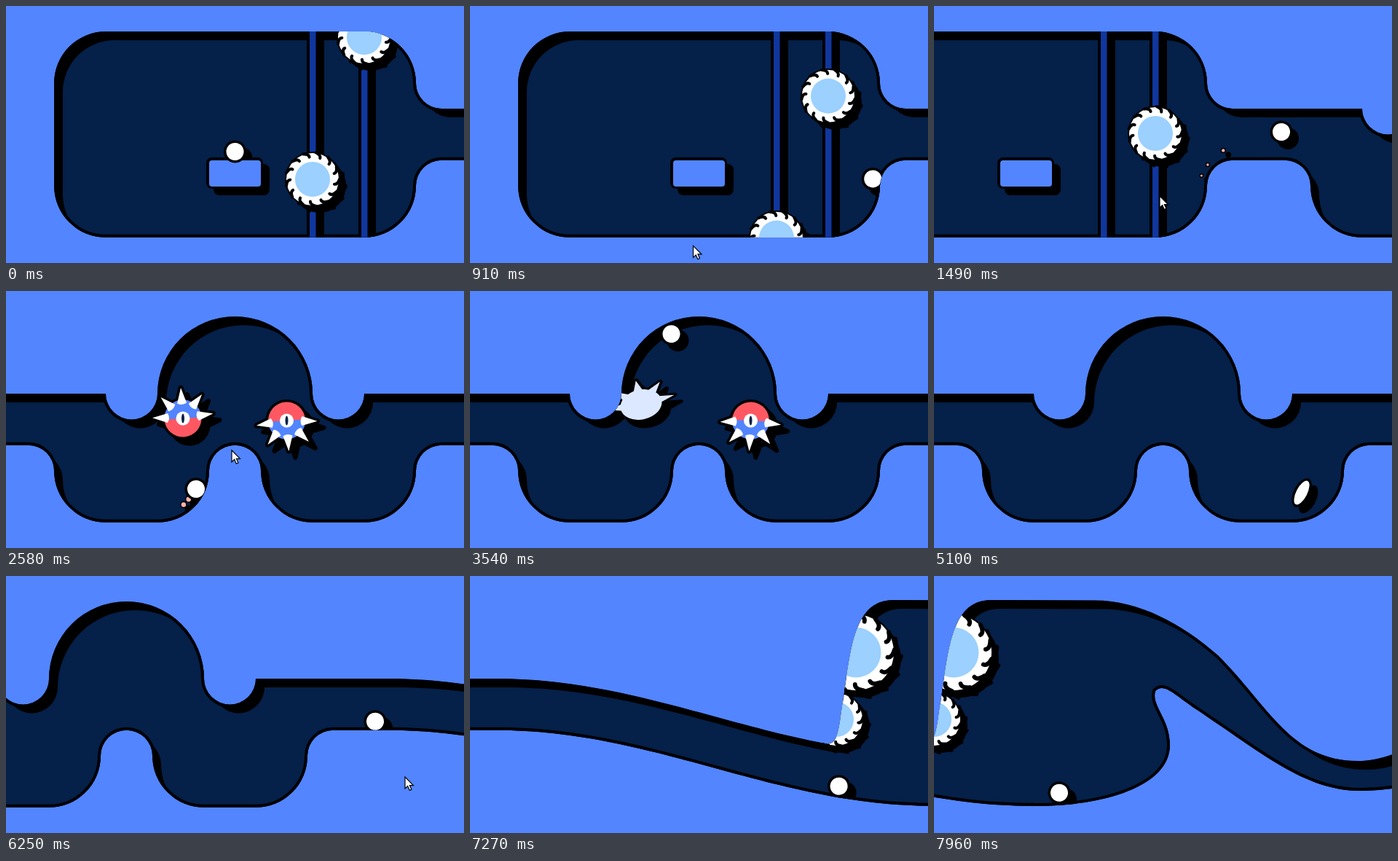
Write an HTML page with a canvas that moves like this. It is 629x353 px and loops after 7.99 s.

```html
<!DOCTYPE html>
<html lang="en">
<head>
<meta charset="utf-8">
<title>Ball run</title>
<style>
html, body { margin: 0; width: 100%; height: 100%; overflow: hidden; background: #5285ff; }
canvas { display: block; }
</style>
</head>
<body>
<canvas id="stage" width="629" height="353"></canvas>
<script>
const ctx = document.getElementById('stage').getContext('2d');
const LOOP = 7990, TICK = 10, W = 629, H = 353;
const PI = Math.PI, Q = PI / 2, TAU = PI * 2;
const BLUE = '#5285ff', NAVY = '#052049', RAIL = '#10379e', SKY = '#9bd0ff';
const RED = '#ff5863', PINK = '#ffb3ab', PALE = '#dce8ff', BLACK = '#000', WHITE = '#fff';
const SHADE = 9, DEPTH = 12, BALL = 12;

// ---- level outline on a grid; one room is 18 cells wide ----
const CELL_X = 35.5, CELL_Y = 35.35, ROOM = 18 * CELL_X;
const gridX = x => 314.5 + x * CELL_X;
const gridY = y => 35 + y * CELL_Y;
const SLOPE_FROM = 1313, SLOPE_TO = 1913;

function slope(x) {
  const u = Math.min(Math.max((x - SLOPE_FROM) / (SLOPE_TO - SLOPE_FROM), 0), 1);
  return 52 * (1 - Math.cos(PI * u));
}

function buildCave() {
  const p = new Path2D();
  const arc = (x, y, r, from, to, back = false) =>
    p.ellipse(gridX(x), gridY(y), r * CELL_X, r * CELL_Y, 0, from, to, back);
  const pit = (left, right) => {
    arc(right + 1, 6, 1, -Q, -PI, true);
    arc(right - 2, 6, 2, 0, Q);
    arc(left + 2, 6, 2, Q, PI);
    arc(left - 1, 6, 1, 0, -Q, true);
  };
  // first room and its neck, then the dome between two hanging bumps
  arc(-5, 2, 2, PI, 3 * Q);
  arc(5, 2, 2, -Q, 0);
  arc(8, 2, 1, PI, Q, true);
  arc(14, 3, 1, PI, 0, true);
  arc(18, 3, 3, PI, TAU);
  arc(22, 3, 1, PI, 0, true);
  // ramp ceiling, then the big hall and its exit
  for (let x = SLOPE_FROM; x <= 1765; x += 10) p.lineTo(x, gridY(3) + slope(x));
  p.bezierCurveTo(1778, 234, 1782, 222, 1786, 195);
  p.bezierCurveTo(1800, 110, 1800, 33, 1858, 33);
  p.lineTo(2000, 33.5);
  p.bezierCurveTo(2060, 33, 2120, 65, 2170, 109);
  p.bezierCurveTo(2240, 179, 2270, 254, 2362, 254);
  p.bezierCurveTo(2400, 254, 2440, 235, 2480, 205);
  // back along the ground
  p.lineTo(2480, 280);
  p.bezierCurveTo(2440, 288, 2400, 295, 2365, 295);
  p.bezierCurveTo(2290, 295, 2230, 243, 2140, 183);
  p.bezierCurveTo(2110, 163, 2096, 146, 2084, 158);
  p.bezierCurveTo(2078, 178, 2104, 196, 2104, 232);
  p.bezierCurveTo(2104, 290, 2010, 317, SLOPE_TO, 316);
  for (let x = SLOPE_TO; x >= SLOPE_FROM; x -= 10) p.lineTo(x, gridY(5) + slope(x));
  pit(19, 25);
  pit(11, 17);
  arc(8, 6, 1, -Q, -PI, true);
  arc(5, 6, 2, 0, Q);
  arc(-5, 6, 2, Q, PI);
  p.closePath();
  return p;
}
const cave = buildCave();

// ---- motion ----
// Keys are [time, x, y, lift]; lift bows the way to the next key upwards.
function follow(keys, t) {
  let i = 0;
  while (i < keys.length - 2 && t >= keys[i + 1][0]) i++;
  const [t0, x0, y0, lift = 0] = keys[i], [t1, x1, y1] = keys[i + 1];
  const u = Math.min(Math.max((t - t0) / (t1 - t0), 0), 1);
  return [x0 + (x1 - x0) * u, y0 + (y1 - y0) * u - 4 * lift * u * (1 - u)];
}

const RIDE = 6250;
const hops = [
  [150, 314.5, 200, 110], [780, 525, 262], [890, 549, 247, 17], [1120, 598, 199],
  [1330, 625, 199, 72], [2050, 805, 306], [2270, 847, 306, -12], [2580, 900, 272, 20],
  [2950, 953, 199], [3200, 953, 199, 10], [3430, 912, 120], [3540, 915.5, 59, 10],
  [3980, 1024, 138, 60], [4500, 1024, 138, 50], [4960, 1118, 305],
  [5100, 1144, 277, -14], [5420, 1190, 245, 20], [5740, 1238, 200], [RIDE, 1295, 200]
];

function ballAt(t) {
  if (t < RIDE) return follow(hops, t);
  const u = Math.min((t - RIDE) / 1710, 1);
  const x = 1295 + 657 * (1 - (1 - u) ** 1.5);
  return [x, gridY(5) + slope(x) - BALL - 6 * u];
}

const cursorKeys = [
  [650, 305, 360], [1490, 310, 261], [2600, 310, 218], [3000, 318, 360],
  [5750, 525, 360], [RIDE, 548, 276], [6430, 525, 360]
];

const roomTimes = [1435, 6208, 7717];
const camera = t => Math.round(roomTimes.reduce(
  (x, start) => x + (t > start ? ROOM * (1 - Math.exp((start - t) / 158)) : 0), 0));

const hits = [3430, 3980, 4500];
function shake(t) {
  const last = hits.filter(h => h <= t).pop() ?? -1000;
  const age = t - last;
  return age < 100 ? 4 * (1 - age / 100) * Math.sin(age / 7) : 0;
}

// ---- drawing helpers ----
function disc(x, y, r, color) {
  ctx.fillStyle = color;
  ctx.beginPath();
  ctx.arc(x, y, r, 0, TAU);
  ctx.fill();
}

function box(x, y, w, h, r, color) {
  ctx.fillStyle = color;
  ctx.beginPath();
  ctx.roundRect(x, y, w, h, r);
  ctx.fill();
}

function placed(x, y, draw) {
  ctx.save();
  ctx.translate(x, y);
  draw();
  ctx.restore();
}

function drawCave() {
  ctx.fillStyle = BLACK;
  ctx.fill(cave);
  placed(DEPTH, DEPTH, () => { ctx.fillStyle = NAVY; ctx.fill(cave); });
  ctx.strokeStyle = BLACK;
  ctx.lineWidth = 8;
  ctx.stroke(cave);
}

function drawRail(x) {
  box(x - 8, 30, 24, 295, 0, BLACK);
  box(x - 4, 30, 8.5, 295, 0, RAIL);
}

function sawHooks(r, turn) {
  const teeth = 13;
  ctx.strokeStyle = BLACK;
  ctx.lineWidth = r * 0.11;
  ctx.lineCap = 'round';
  ctx.beginPath();
  for (let i = 0; i < teeth; i++) {
    const a = turn + i * TAU / teeth, b = a + 0.22;
    ctx.moveTo(Math.cos(a) * r, Math.sin(a) * r);
    ctx.quadraticCurveTo(Math.cos(b) * r * 0.95, Math.sin(b) * r * 0.95,
      Math.cos(b) * r * 0.83, Math.sin(b) * r * 0.83);
  }
  ctx.stroke();
}

function drawSaw(x, y, r, t) {
  const turn = t / 260;
  placed(x + SHADE, y + SHADE, () => {
    disc(0, 0, r, BLACK);
    sawHooks(r, turn);
  });
  placed(x, y, () => {
    disc(0, 0, r + 1, BLACK);
    disc(0, 0, r - 1, WHITE);
    sawHooks(r, turn);
    disc(0, 0, r * 0.65, SKY);
  });
}

const body = new Path2D();
body.arc(0, 0, 25.5, 0, TAU);

function buildSpikes() {
  const p = new Path2D();
  for (let i = -2; i <= 2; i++) {
    const a = i * 0.74 - Q;
    const at = (r, side) => [
      Math.cos(a) * r - Math.sin(a) * side, Math.sin(a) * r + Math.cos(a) * side];
    p.moveTo(...at(42, 0));
    p.lineTo(...at(21, 6.5));
    p.quadraticCurveTo(...at(17, 0), ...at(21, -6.5));
    p.closePath();
  }
  return p;
}
const spikes = buildSpikes();

function silhouette(color, line) {
  ctx.fillStyle = ctx.strokeStyle = color;
  ctx.lineJoin = 'round';
  ctx.lineWidth = line;
  for (const part of [body, spikes]) {
    ctx.fill(part);
    if (line) ctx.stroke(part);
  }
}

function drawEnemy(x, y, angle, hurt) {
  const pose = (offset, draw) => placed(x + offset, y + offset, () => {
    ctx.rotate(angle);
    if (hurt) ctx.scale(1.13, 0.8);
    draw();
  });
  pose(SHADE, () => silhouette(BLACK, 6));
  pose(0, () => {
    silhouette(BLACK, 7);
    if (hurt) return silhouette(PALE, 0);
    disc(0, 0, 25.5, RED);
    ctx.fillStyle = BLUE;
    ctx.beginPath();
    ctx.arc(0, 0, 25.5, PI, TAU);
    ctx.fill();
    ctx.fillStyle = WHITE;
    ctx.fill(spikes);
  });
  if (hurt) return;
  disc(x, y, 9.5, WHITE);
  ctx.fillStyle = NAVY;
  ctx.beginPath();
  ctx.ellipse(x, y, 2, 6.5, 0, 0, TAU);
  ctx.fill();
}

function drawEnemies(t) {
  const sway = -0.07 * Math.cos(TAU * (t - 2580) / 700);
  if (t < 3430) drawEnemy(882, 175, sway, false);
  else if (t < 3620) drawEnemy(874, 156, -0.22, true);
  if (t < 4580) {
    const hurt = (t >= 3980 && t < 4070) || t >= 4500;
    drawEnemy(1024.5, 178, PI + sway, hurt);
  }
}

function drawBall(t, offset, grow, color) {
  const [x, y] = ballAt(t);
  const stretch = Math.max(0, 1 - Math.abs(t - 5100) / 70);
  ctx.fillStyle = color;
  ctx.beginPath();
  ctx.ellipse(x + offset, y + offset, BALL + 6 * stretch + grow,
    BALL - 4.5 * stretch + grow, -1.1, 0, TAU);
  ctx.fill();
}

// ---- dust left on climbs, shards of broken enemies ----
function drawDust(t) {
  for (const start of [920, 960, 1060, 2480, 2520]) {
    const age = (t - start) / 700;
    if (age < 0 || age >= 1) continue;
    const [x, y] = ballAt(start);
    const r = 3.5 * Math.sqrt(1 - age);
    disc(x + 7, y + 6, r + 2, BLACK);
    disc(x, y, r + 1.5, BLACK);
    disc(x, y, r, PINK);
  }
}

function drawBurst(t, start, x, y) {
  const colors = [WHITE, RED, PINK, BLUE];
  const age = (t - start) / 450;
  if (age < 0 || age >= 1) return;
  for (let i = 0; i < 14; i++) {
    const a = i * 2.4, reach = (35 + i * 37 % 60) * age;
    const px = x + Math.cos(a) * reach;
    const py = y + Math.sin(a) * reach + 70 * age * age;
    const r = (2.5 + i % 4) * (1 - age);
    disc(px + 6, py + 6, r + 1.5, BLACK);
    disc(px, py, r + 1.5, BLACK);
    disc(px, py, r, colors[i % 4]);
  }
}

const arrow = new Path2D('M0 0V16L3.7 12.6L6.3 18.4L8.9 17.2L6.4 11.6H11.4Z');
function drawCursor(t) {
  placed(...follow(cursorKeys, t), () => {
    ctx.fillStyle = WHITE;
    ctx.strokeStyle = BLACK;
    ctx.lineWidth = 1.2;
    ctx.fill(arrow);
    ctx.stroke(arrow);
  });
}

function render(t) {
  ctx.fillStyle = BLUE;
  ctx.fillRect(0, 0, W, H);
  ctx.save();
  const jolt = shake(t);
  ctx.translate(jolt - camera(t), jolt * 0.6);
  ctx.clip(cave);
  drawCave();
  drawRail(421);
  drawRail(492);
  const drop = t * 0.0886;
  drawSaw(421, 238 + drop, 37, t);
  drawSaw(492, 43 + drop, 37, t);
  drawSaw(1780, 197, 37, t);
  drawSaw(1807, 105, 53, t);
  drawEnemies(t);
  drawDust(t);
  drawBall(t, SHADE, 3, BLACK);
  box(285, 217, 77, 43, 8, BLACK);
  box(275, 208, 78, 43, 8, BLACK);
  box(279, 212, 71, 36, 4, BLUE);
  drawBall(t, 0, 3.5, BLACK);
  drawBall(t, 0, 0, WHITE);
  drawBurst(t, 3620, 876, 158);
  drawBurst(t, 4580, 1024, 178);
  ctx.restore();
  drawCursor(t);
}

// The game advances in fixed ticks.
const begin = performance.now();
function frame() {
  const t = (performance.now() - begin) % LOOP;
  render(Math.floor((t + 3) / TICK) * TICK);
  requestAnimationFrame(frame);
}
frame();
</script>
</body>
</html>
```
